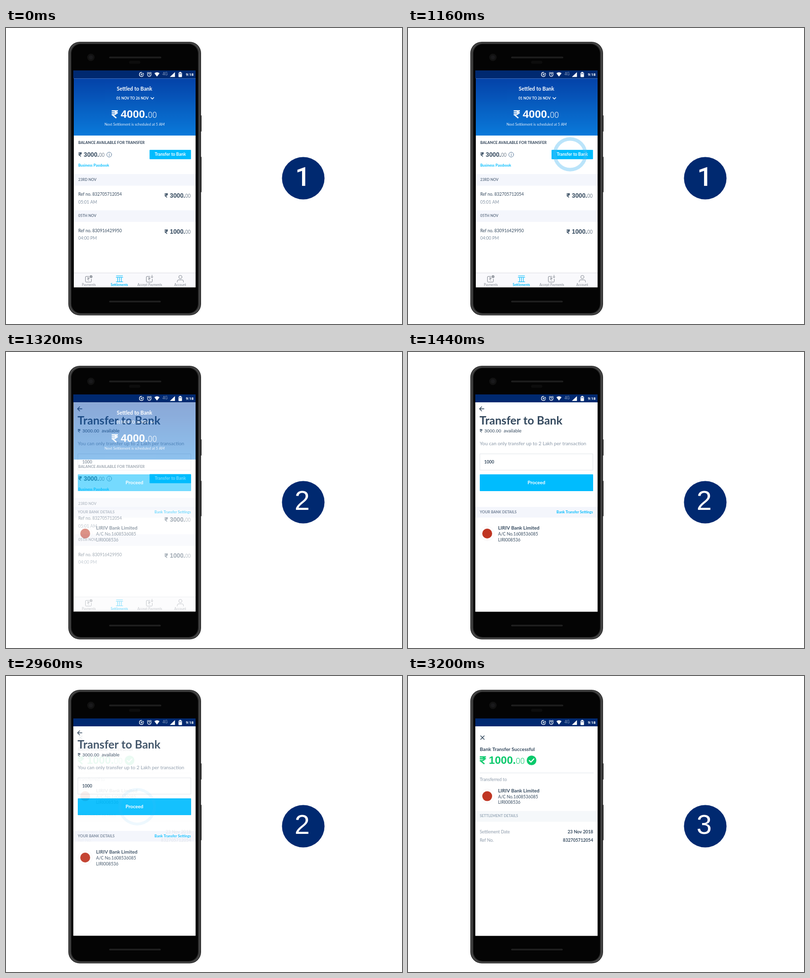
An HTML page with a canvas that plays this animation: 800 px wide and 600 px high, repeating every 4880 ms.

```html
<!DOCTYPE html>
<html lang="en">
<head>
<meta charset="utf-8">
<title>Transfer to bank</title>
<style>
  html, body { margin: 0; width: 100%; height: 100%; overflow: hidden; background: #fff; }
  canvas { display: block; }
</style>
</head>
<body>
<canvas id="stage" width="800" height="600"></canvas>
<script>
const W = 800, H = 600, LOOP = 4880, STEP = 40;
const LATO = 'Lato, sans-serif';
const ROBOTO = 'Roboto, sans-serif';
const ARIAL = '"Liberation Sans", Arial, sans-serif';
const NAVY = '#002970', CYAN = '#00bcfe', INK = '#34495e', GREY = '#8b99a9';
const STRIP = '#f4f6fc', GREEN = '#09c96b', ICON = '#858b94';
const BANK = { name: 'LIRIV Bank Limited', account: 'A/C No.1608536085', code: 'LIRI008536' };

const stage = document.getElementById('stage').getContext('2d');
let g = stage;

function layer(draw) {
  const canvas = document.createElement('canvas');
  canvas.width = W;
  canvas.height = H;
  g = canvas.getContext('2d');
  g.lineCap = g.lineJoin = 'round';
  draw();
  g = stage;
  return canvas;
}

function text(str, x, y, size, color, { weight = 400, align = 'left', font = LATO } = {}) {
  g.font = `${weight} ${size}px ${font}`;
  g.textAlign = align;
  g.fillStyle = color;
  g.fillText(str, x, y);
}

const bold = (str, x, y, size, color, align) => text(str, x, y, size, color, { weight: 700, align });

function rect(x, y, w, h, color, radius = 0) {
  g.fillStyle = color;
  g.beginPath();
  g.roundRect(x, y, w, h, radius);
  g.fill();
}

function disc(x, y, r, color) {
  g.fillStyle = color;
  g.beginPath();
  g.arc(x, y, r, 0, Math.PI * 2);
  g.fill();
}

function line(path, color, width = 1) {
  g.strokeStyle = color;
  g.lineWidth = width;
  g.stroke(new Path2D(path));
}

function shape(path, color) {
  g.fillStyle = color;
  g.fill(new Path2D(path));
}

function ring(x, y, r, color, width = 1) {
  g.strokeStyle = color;
  g.lineWidth = width;
  g.beginPath();
  g.arc(x, y, r, 0, Math.PI * 2);
  g.stroke();
}

// Rupee sign: top left corner, size, stroke width
function rupee(x, y, w, h, color, width) {
  g.save();
  g.translate(x, y);
  g.lineCap = 'butt';
  line(`M0 0H${w} M0 ${h * .27}H${w} M0 0H${w * .3}
    C${w * .9} 0 ${w * .9} ${h * .54} ${w * .3} ${h * .54}H0
    M${w * .12} ${h * .54}L${w * .75} ${h}`, color, width);
  g.restore();
}

function amount(whole, x, y, size, color, cents) {
  text(whole, x, y, size, color, { weight: 700, font: ARIAL });
  text('00', x + size * 2.5, y, cents, color, { weight: 300, font: ROBOTO });
}

function smallAmount(whole, x, y) {
  rupee(x + .5, y - 8, 6.5, 8, INK, 1.4);
  amount(whole, x + 11, y, 12.4, INK, 10);
}

function phone() {
  rect(0, 0, W, H, '#fff');
  rect(391, 177, 4, 33, '#2b2b2b', 1);
  rect(391, 261, 4, 72, '#2b2b2b', 1);
  rect(126, 28, 268, 554.5, '#1c1c1c', 23);
  rect(127.2, 29, 265.6, 552.5, '#474747', 22);
  rect(130, 31, 260, 548.5, '#303030', 20.5);
  rect(132, 32.5, 256, 545.5, '#040404', 19);
  disc(171.5, 59.5, 7.5, '#121212');
  disc(171.5, 59.5, 4, '#1a1a1c');
  line('M210 59.8H312', '#2b2b2b', 3);
  line('M210 59.8H312', '#111', 1);
  rect(248.5, 66.5, 23, 6, '#0d0d0d', 3);
  line('M210 554.5H311', '#2b2b2b', 3);
  line('M210 554.5H311', '#111', 1);
  rect(136, 86, 247, 16.5, NAVY);
  statusIcons();
  disc(600.5, 304.5, 43, NAVY);
}

function statusIcons() {
  line('M277.5 96A4.2 4.2 0 1 1 274 90 M276.5 91.4A4.2 4.2 0 0 1 278 94', '#fff', 1.3);
  line('M274 92V96 M272 94H276', '#fff', 1.1);
  ring(289.5, 94.5, 3.6, '#fff', 1.2);
  line('M289.5 92.5V94.8L291 95.7 M285 91.3L287 89.6 M294 91.3L292 89.6', '#fff', 1);
  shape('M299.8 91.8Q305 87.6 310.2 91.8L305 98.6Z', '#fff');
  text('4G', 316, 95.5, 8.6, '#8194ba', { font: ROBOTO });
  shape('M331 99.3L341.3 89.5V99.3Z', '#fff');
  rect(348.5, 90.5, 7, 9, '#fff', 1);
  rect(350.3, 89, 3.4, 2, '#fff');
  rect(349.3, 91.5, 5.4, 2, '#7e93bd');
  text('9:18', 379.2, 97.2, 8, '#fff', { weight: 700, align: 'right', font: ROBOTO });
}

function settlementRow(top, date, ref, time, whole) {
  rect(137, top, 246, 23.5, STRIP);
  bold(date, 146, top + 13.6, 7.3, '#66768a');
  text(ref, 146, top + 44, 8.55, INK);
  text(time, 146, top + 59.6, 8.6, '#8292a3');
  smallAmount(whole, 320, top + 47.6);
}

function tabBar() {
  rect(137, 496.5, 246, 29, '#f9f9fc');
  rect(137, 496, 246, 1, '#dedfe4');
  for (const x of [160.5, 283.5]) {
    line(`M${x + 7} 503.5H${x + 1.5}Q${x} 503.5 ${x} 505V513.5Q${x} 515 ${x + 1.5} 515H${x + 10.5}
      Q${x + 12} 515 ${x + 12} 513.5V509`, ICON);
    rupee(x + 4, 506.3, 4, 6, ICON, .9);
  }
  disc(171.8, 504, 2.8, ICON);
  line('M170.6 504L171.5 505L173 503.2', '#fff', .7);
  line('M295 501V506 M293 504.2L295 506.2L297 504.2', ICON);
  line('M223 502.5H235.5 M222.5 505.5H236 M225.5 506V513.5 M229.2 506V513.5 M233 506V513.5 M222.5 514.5H236', CYAN, 1.1);
  ring(352.3, 504.8, 3.3, ICON);
  line('M346 515V513.5Q346 510.5 349 510.5H355.5Q358.5 510.5 358.5 513.5V515', ICON);
  const label = (str, x) => text(str, x, 522.6, 6.6, ICON, { align: 'center' });
  label('Payments', 167.3);
  label('Accept Payments', 290.5);
  label('Account', 352);
  bold('Settlements', 229, 522.6, 6.6, CYAN, 'center');
}

function settlements() {
  rect(136, 102, 1, 423.5, '#040404');
  rect(137, 102, 246, 423.5, '#fff');
  const sky = g.createLinearGradient(0, 102, 0, 218);
  sky.addColorStop(0, '#0442a8');
  sky.addColorStop(1, '#0a7ada');
  rect(137, 102, 246, 116, sky);
  rect(137, 102, 246, 1, '#3f6fbb');
  bold('Settled to Bank', 259.5, 127, 10.5, '#fff', 'center');
  bold('01 NOV TO 26 NOV', 223, 145, 7.1, '#fff');
  line('M292.7 141L295.6 144L298.5 141', '#fff', 1.5);
  rupee(213.5, 168, 12.5, 14.5, '#fff', 2.5);
  amount('4000.', 231.8, 182.3, 22, '#fff', 16.2);
  text('Next Settlement is scheduled at 5 AM', 259.8, 198.3, 7.35, '#e3edfa', { align: 'center' });

  bold('BALANCE AVAILABLE FOR TRANSFER', 146, 235, 7.65, '#2f4257');
  smallAmount('3000.', 146, 260.6);
  ring(208.5, 256.7, 4.9, '#5c7c9c');
  line('M208.5 256V259.2 M208.5 254V254.2', '#5c7c9c');
  rect(290, 247, 83.7, 19, CYAN, 1);
  bold('Transfer to Bank', 331.8, 259.3, 8.6, '#fff', 'center');
  bold('Business Passbook', 146, 281.3, 7.45, CYAN);
  settlementRow(296, '23RD NOV', 'Ref no. 832705712054', '05:01 AM', '3000.');
  settlementRow(369.6, '05TH NOV', 'Ref no. 830916429950', '04:00 PM', '1000.');
  tabBar();
}

function bankCard(y) {
  ring(160, y + 8, 14.5, '#f6f6f8');
  disc(160, y + 8, 10, '#bf3522');
  bold(BANK.name, 182, y, 9.8, INK);
  text(BANK.account, 182, y + 12.2, 8.6, INK);
  text(BANK.code, 182, y + 23.6, 8.7, INK);
}

function transfer() {
  rect(136, 102, 247, 424.5, '#fff');
  line('M153.5 115.3H144.8 M148.8 111L144.5 115.3L148.8 119.6', INK, 1.4);
  bold('Transfer to Bank', 144.5, 146.6, 22.9, INK);
  rupee(145.3, 157, 5, 6.3, INK, 1);
  text('3000.00', 154.3, 163.2, 9.4, INK, { font: ARIAL });
  text('available', 193.3, 163.2, 9.5, INK);
  text('You can only transfer up to 2 Lakh per transaction', 145, 189.2, 9.85, GREY);
  line('M145.5 206.5H373.5V239.5H145.5Z', '#e3e6eb');
  bold('1000', 154, 225.6, 8.6, INK);
  rect(145, 248, 229, 34, CYAN, 1);
  bold('Proceed', 259.5, 268.4, 9.8, '#fff', 'center');
  rect(136, 314, 247, 21.5, STRIP);
  bold('YOUR BANK DETAILS', 145, 327.2, 7.45, '#728196');
  bold('Bank Transfer Settings', 373.6, 327.2, 7.4, CYAN, 'right');
  bankCard(360);
}

function success() {
  rect(136, 102, 247, 424.5, '#fff');
  line('M146.8 121.3L154 128.6 M154 121.3L146.8 128.6', INK, 1.4);
  bold('Bank Transfer Successful', 145, 152, 10.1, INK);
  rupee(145, 164, 12.5, 14.3, GREEN, 2.5);
  amount('1000.', 163.3, 178.3, 21.8, GREEN, 16.2);
  disc(249.6, 171, 9.8, GREEN);
  line('M245 171.2L248.3 174.5L254.3 168', '#fff', 2);
  rect(145, 196, 230, 1, '#e3e7ec');
  text('Transferred to', 145, 213.2, 8.9, GREY);
  bankCard(235.6);
  rect(136, 273.5, 247, 22, '#f5f8fa');
  bold('SETTLEMENT DETAILS', 145, 286.4, 7.4, '#9babba');
  text('Settlement Date', 145, 319, 8.5, GREY);
  bold('23 Nov 2018', 374, 319, 8.9, INK, 'right');
  text('Ref No.', 145, 335.5, 8.6, GREY);
  bold('832705712054', 374, 335.5, 8.75, INK, 'right');
}

const base = layer(phone);
const screens = [settlements, transfer, success].map(layer);
const taps = [{ at: 920, x: 327.5, y: 256 }, { at: 2600, x: 265, y: 265 }];
const fades = [1180, 2940], FADE = 260;
const digitCuts = [1320, 3080];

function ripple({ at, x, y }, t) {
  const p = (t - at) / 400;
  if (p < 0 || p >= 1) return;
  const ease = 1 - (1 - p) ** 2;
  g.globalAlpha = .97 * (1 - p);
  g.fillStyle = '#4fb9f2';
  g.beginPath();
  g.arc(x, y, 16.2 + 22 * ease, 0, Math.PI * 2);
  g.arc(x, y, 1.5 + 31 * ease, 0, Math.PI * 2, true);
  g.fill('evenodd');
  g.globalAlpha = 1;
}

function stepDigit(t) {
  const digit = 1 + digitCuts.filter(cut => t >= cut).length;
  // Roboto's 1 has no foot
  if (digit === 1) text(digit, 599.6, 320.3, 54, '#fff', { weight: 500, align: 'center', font: ROBOTO });
  else text(digit, 598.3, 320, 55, '#fff', { align: 'center', font: ARIAL });
}

function render(t) {
  g.drawImage(base, 0, 0);
  g.drawImage(screens[0], 0, 0);
  fades.forEach((start, i) => {
    g.globalAlpha = Math.min(1, Math.max(0, (t - start) / FADE));
    g.drawImage(screens[i + 1], 0, 0);
  });
  g.globalAlpha = 1;
  taps.forEach(tap => ripple(tap, t));
  stepDigit(t);
}

const began = performance.now();
function tick() {
  const t = (performance.now() - began) % LOOP;
  render(Math.floor(t / STEP) * STEP);
  requestAnimationFrame(tick);
}
tick();
</script>
</body>
</html>
```
